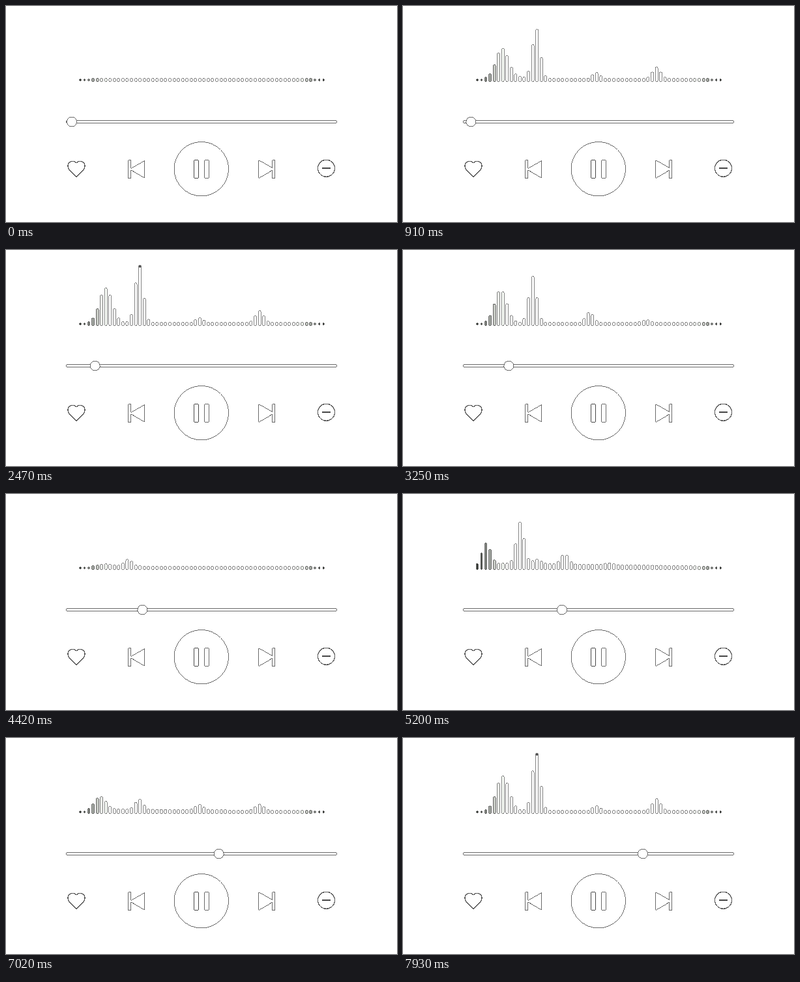
These frames come from a looping animation (600x333 px, 8 s). An HTML page:

```html
<!DOCTYPE html>
<html lang="en">
<head>
<meta charset="utf-8">
<title>Music player</title>
<style>
html, body { margin: 0; width: 100%; height: 100%; overflow: hidden; background: #fff; }
svg { display: block; width: 600px; height: 333px; shape-rendering: crispEdges; }
.line { fill: #fff; stroke: #5a5a5a; stroke-width: 0.9; }
.bold { fill: #fff; stroke: #5a5a5a; stroke-width: 1.3; }
</style>
</head>
<body>
<svg viewBox="0 0 600 333">
  <g id="bars"></g>
  <rect class="line" x="92.5" y="176.5" width="415" height="4" rx="2"/>
  <circle class="line" id="knob" cx="101" cy="178.5" r="7.5"/>
  <path class="bold" d="M108 263.3 L97 252.8 Q93.5 247 96 242.5 Q98.5 239.3 102.5 239.3 Q106 239.5 108 242 Q110 239.5 113.5 239.3 Q117.5 239.3 120 242.5 Q122.5 247 119 252.8 Z"/>
  <path class="line" id="skip" d="M187.5 237.5 H191.5 V250 L212.5 238 V265 L191.5 253 V265.5 H187.5 Z"/>
  <use href="#skip" transform="translate(600 0) scale(-1 1)"/>
  <circle class="line" cx="299.8" cy="251.2" r="41.8"/>
  <rect class="line" x="288.5" y="237.5" width="7" height="28" rx="1.5" style="stroke:#333"/>
  <rect class="line" x="304.5" y="237.5" width="7" height="28" rx="1.5"/>
  <circle class="bold" cx="491.5" cy="250.2" r="13"/>
  <path d="M485 250 H498" stroke="#444" stroke-width="1.5"/>
</svg>
<script>
const LOOP = 8000, STEP = 130, COUNT = 58;

// bass: [bar, height]; tone: [bar, height of each harmonic]; side: [bar, height]
const high = { bass: [6, 53], tone: [13.8, 90, 7, 18] };
const low = { bass: [2.1, 46], tone: [10.1, 85, 21, 4], side: [14, 9], hum: 7 };
const notes = [
  { at: 0 },
  { at: 260 },
  { at: 780, ...high },
  { at: 1690, bass: [5.1, 49], tone: [13.8, 58, 27, 29], side: [10, 17] },
  { at: 2470, ...high },
  { at: 3250, bass: [5.5, 50], tone: [13, 71, 16, 4] },
  { at: 4420, bass: [6, 3], tone: [11.2, 10], hum: 1 },
  { at: 4940, ...low },
  { at: 5980, ...low },
  { at: 7020, bass: [4.7, 20], tone: [13.8, 16, 8, 9], hum: 2 },
  { at: 7930, ...high },
  { at: LOOP, ...high }
];

const bell = (d, width) => Math.exp(-d * d / (2 * width * width));

function spectrum({ bass = [0, 0], tone: [pitch, ...levels] = [0], side = [0, 0], hum = 0 }) {
  return Array.from({ length: COUNT }, (_, i) => {
    let h = bass[1] * bell(i - bass[0], 0.8 + bass[0] / 9)
      + side[1] * bell(i - side[0], 1)
      + hum * Math.min(1, i / 6) * (1 - i / COUNT);
    levels.forEach((level, k) => {
      h += level * bell(i - (k + 1) * (pitch + 0.3) + 0.3, 0.9);
    });
    return h < 0.8 ? 0 : h;
  });
}

notes.forEach(note => { note.heights = spectrum(note); });

// Blend of two notes, sinking halfway between them
function heightsAt(t) {
  const k = Math.max(1, notes.findIndex(n => n.at > t));
  const a = notes[k - 1], b = notes[k];
  const u = (t - a.at) / (b.at - a.at);
  const swell = 1 - 0.5 * Math.sin(Math.PI * u) ** 2;
  return a.heights.map((h, i) => (h + (b.heights[i] - h) * u) * swell);
}

// Still at first, then gathering speed up to a steady glide
function knobX(t) {
  const s = Math.max(0, t - 260) / 1000;
  const ramp = 5.4, top = 45.5;
  const speed = Math.min(s, ramp);
  const eased = speed * speed / ramp - speed ** 3 / (3 * ramp * ramp);
  return 101 + top * (eased + Math.max(0, s - ramp));
}

function make(parent, name, attrs) {
  const el = document.createElementNS("http://www.w3.org/2000/svg", name);
  for (const key in attrs) el.setAttribute(key, attrs[key]);
  return parent.appendChild(el);
}

const group = document.getElementById("bars");
const knob = document.getElementById("knob");

const bars = Array.from({ length: COUNT }, (_, i) => {
  const edge = Math.min(i, COUNT - 1 - i);
  const small = edge < 3;
  const w = small ? 2.4 : 4;
  const x = 113.9 + i * 6.55;
  const g = Math.min(255, 55 + 37 * edge);
  const rect = make(group, "rect", {
    x: x - w / 2, width: w, rx: w / 2,
    fill: `rgb(${g - 4},${g},${g - 6})`,
    stroke: edge < 5 ? "#505050" : "#666", "stroke-width": 0.8
  });
  if (edge > 6) rect.setAttribute("fill", "#fff");
  const tip = make(group, "rect", { x: x - 1.5, width: 3, height: 4, rx: 1.5, fill: "#555" });
  return { rect, tip, small };
});

function draw(t) {
  const heights = heightsAt(t);
  bars.forEach(({ rect, tip, small }, i) => {
    const h = heights[i];
    const rest = small && h < 1;
    const top = (rest ? 112.4 : 111.3) - h;
    rect.setAttribute("y", top);
    rect.setAttribute("height", (rest ? 115.6 : 116.7) - top);
    tip.setAttribute("y", top);
    tip.setAttribute("visibility", h > 80 ? "visible" : "hidden");
  });
  knob.setAttribute("cx", knobX(t));
}

const start = performance.now();
function tick() {
  const t = (performance.now() - start) % LOOP;
  draw(Math.floor(t / STEP) * STEP);
  requestAnimationFrame(tick);
}
draw(0);
requestAnimationFrame(tick);
</script>
</body>
</html>
```
